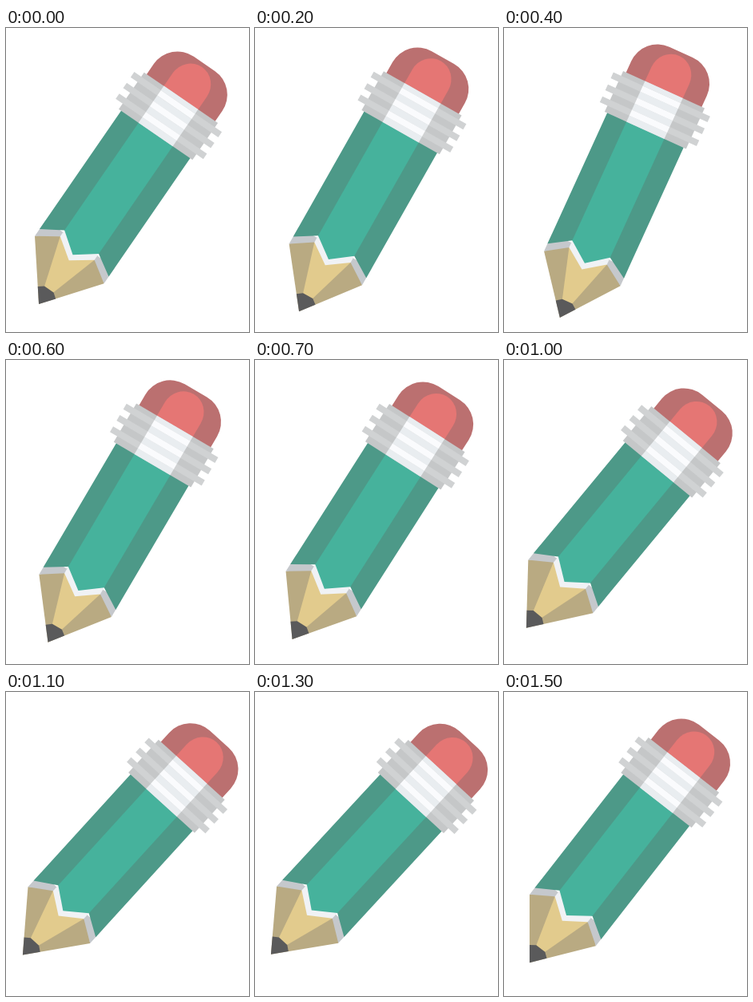
These frames come from a looping animation (304 by 381 pixels, 1600 ms). An HTML page:

```html
<!DOCTYPE html>
<html lang="en">
<head>
<meta charset="utf-8">
<title>Wobbling pencil</title>
<style>
  html, body { margin: 0; height: 100%; overflow: hidden; background: #fff; }
  svg { display: block; width: 100vw; height: 100vh; }
</style>
</head>
<body>
<svg viewBox="0 0 304 381">
  <!-- Drawn upright and symmetric about x = 0; the pivot is the stage centre -->
  <g id="pencil">
    <g id="wood">
      <path fill="#b9aa82" d="M-52.5 124L-26 100H26L52.5 124L0 191.5Z"/>
      <path fill="#e2cb8d" d="M-26 100H26V106.5L0 191.5L-26 106.5Z"/>
      <path fill="#5a5a5b" d="M-13.6 174L-7 169H7L13.6 174L0 191.5Z"/>
    </g>
    <g id="band">
      <path fill="#c5c8cc" d="M-52.5 100H52.5V124L26 106.5H-26L-52.5 124Z"/>
      <path fill="#f0f2f5" d="M-26 90H26V106.5L0 125L-26 106.5Z"/>
    </g>
    <g id="body">
      <path fill="#4d9988" d="M-52.5 -70H52.5V113.5L26 97H-26L-52.5 113.5Z"/>
      <path fill="#46b29c" d="M-26 -70H26V97L0 116.5L-26 97Z"/>
    </g>
    <g id="eraser">
      <path fill="#bb7070" d="M-52 -120V-138A36 36 0 0 1 -16 -174H16A36 36 0 0 1 52 -138V-120Z"/>
      <path fill="#e57674" d="M-26 -120V-142A26 27 0 0 1 26 -142V-120Z"/>
    </g>
    <g id="ferrule">
      <path fill="#c5c7c8" d="M-56 -122.5H56V-66.5H-56Z"/>
      <path fill="#e9edf0" d="M-26 -122.5H26V-66.5H-26Z"/>
      <path fill="#d0d2d3" d="M-66.5 -116H66.5v8H-66.5ZM-66.5 -99.5H66.5v8H-66.5ZM-66.5 -83H66.5v8H-66.5Z"/>
      <path fill="#fafbfd" d="M-26 -116H26v8H-26ZM-26 -99.5H26v8H-26ZM-26 -83H26v8H-26Z"/>
    </g>
  </g>
</svg>
<script>
  const STEP = 100;
  const REST = 34.5;
  // Swing away from the resting tilt, in degrees, one per step
  const swing = [0, -2.5, -5, -7.5, -10, -7, -4.1, -2, 0, 2, 5, 7.8, 11, 8.2, 5.8, 3.4];
  const pencil = document.getElementById('pencil');

  function draw(now) {
    const tilt = REST + swing[Math.floor(now / STEP) % swing.length];
    pencil.setAttribute('transform', `translate(152 190) rotate(${tilt}) translate(-3 0)`);
    requestAnimationFrame(() => draw(performance.now()));
  }
  draw(performance.now());
</script>
</body>
</html>
```
